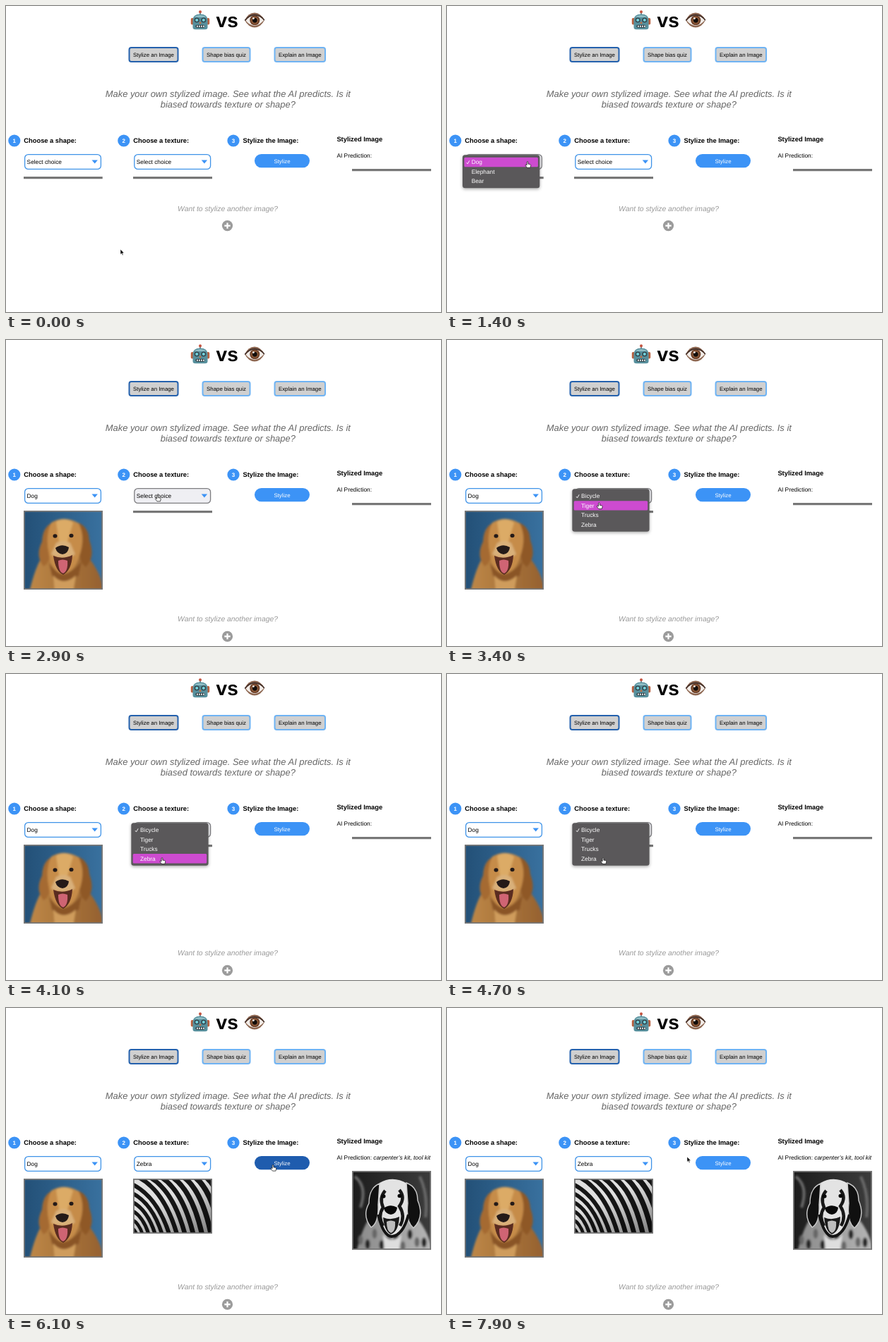
Animation, 616 px wide and 434 px high, one loop 8 s. Source, as an HTML page:

```html
<!DOCTYPE html>
<html lang="en">
<head>
<meta charset="utf-8">
<title>Stylize an image</title>
<style>
  html, body { margin: 0; width: 100%; height: 100%; overflow: hidden; background: #fff; }
  svg { display: block; width: 100vw; height: 100vh; }
  svg svg { width: auto; height: auto; }
  text { font-family: "Liberation Sans", Arial, Helvetica, sans-serif; text-rendering: geometricPrecision; }
</style>
</head>
<body>
<svg id="stage" viewBox="0 0 616 434" xmlns="http://www.w3.org/2000/svg"></svg>
<script>
const LOOP = 8000, STEP = 100, ROW = 13.4, MENU_TOP = 211.3;
const BLUE = '#3c93f6', GREY = '#777';

const text = (x, y, size, str, attrs = '') =>
  `<text x="${x}" y="${y}" font-size="${size}" ${attrs}>${str}</text>`;
const rect = (x, y, w, h, fill, attrs = '') =>
  `<rect x="${x}" y="${y}" width="${w}" height="${h}" fill="${fill}" ${attrs}/>`;
const circle = (x, y, r, fill, attrs = '') =>
  `<circle cx="${x}" cy="${y}" r="${r}" fill="${fill}" ${attrs}/>`;
const ellipse = (x, y, rx, ry, fill) =>
  `<ellipse cx="${x}" cy="${y}" rx="${rx}" ry="${ry}" fill="${fill}"/>`;
const path = (d, fill, attrs = '') => `<path d="${d}" fill="${fill}" ${attrs}/>`;
const line = (d, color, width) => path(d, 'none', `stroke="${color}" stroke-width="${width}"`);
const group = (id, content, attrs = '') => `<g id="${id}" ${attrs}>${content}</g>`;
const blur = (name, content) => `<g filter="url(#${name})">${content}</g>`;

const BOLD = 'font-weight="700"', ITALIC = 'font-style="italic"', MIDDLE = 'text-anchor="middle"';

function navButton(x, w, label, border) {
  return rect(x + 1, 59, w - 2, 20, '#d0d0d0', `rx="3" stroke="${border}" stroke-width="2"`) +
    text(x + w / 2, 72.3, 7.85, label, MIDDLE);
}

function stepTitle(x, number, title) {
  return circle(x, 191, 8.6, BLUE) +
    text(x, 193.9, 8, number, `${BOLD} ${MIDDLE} fill="#fff"`) +
    text(x + 13.5, 194.2, 9.33, title, BOLD);
}

function select(id, x) {
  return rect(x + .6, 210.6, 107.8, 20.8, '#fff', `id="${id}Box" rx="5" stroke-width="1.3"`) +
    text(x + 3.6, 224, 8.3, 'Select choice', `id="${id}Label"`) +
    path(`M${x + 95.5} 218.4h8.4l-4.2 5.2z`, BLUE);
}

function menu(id, x, items) {
  const rows = items.map((item, i) =>
    text(x + 12.7, 224.4 + i * ROW, 8.3, item, 'fill="#fff"')).join('');
  return group(id,
    rect(x, MENU_TOP, 109.3, items.length * ROW + 6.8, '#5a595a', 'rx="3.5" filter="url(#shadow)"') +
    rect(x + 2.4, 0, 104.5, ROW, '#cd4bd0', `id="${id}Mark" rx="1.5"`) + rows +
    line(`M${x + 5.6} 222l1.6 1.9 2.6-4.6`, '#fff', .9));
}

function frame(id, x, y, h, content) {
  return group(id, `<g clip-path="url(#clip${h})">${content}</g>` +
    rect(.9, .9, 110.2, h - 1.8, 'none', `stroke="${GREY}" stroke-width="1.8"`),
    `transform="translate(${x} ${y})"`);
}

const eyesAndNose = color =>
  ellipse(44.5, 36, 3, 2.8, color) + ellipse(67.5, 35.5, 3, 2.8, color) +
  path('M45 53Q54 46 64 52Q63 61 55 62Q47 61 45 53Z', color);

function goldenDog() {
  return rect(0, 0, 112, 112, 'url(#sky)') +
    blur('soft',
      path('M28 62Q16 80 8 116H114Q110 88 90 64Z', 'url(#fur)') +
      path('M36 74Q56 104 82 72L78 92Q56 110 40 92Z', '#8a5526') +
      path('M42 92Q56 108 74 92L70 116H44Z', '#cf9c5b') +
      path('M39 18Q27 24 26 44Q16 64 28 79Q40 74 38 46Z', '#a56a30') +
      path('M77 17Q92 23 93 42Q102 66 88 80Q76 72 79 44Z', '#8f5828') +
      path('M39 17Q58 6 78 18Q88 38 79 64Q72 88 55 90Q39 86 36 62Q30 36 39 17Z', '#c68c49') +
      path('M46 16Q58 8 70 17L62 44H50Z', '#dcab66') +
      path('M46 46Q56 40 66 46L73 62Q56 72 39 62Z', '#d9b07a')) +
    blur('crisp',
      path('M42 64Q55 70 69 63Q68 84 56 91Q45 86 42 64Z', '#5a2c20') +
      path('M49 71Q55 68 62 71Q63 86 56 89Q49 87 49 71Z', '#cf6473') +
      eyesAndNose('#241a18'));
}

function patternedDog() {
  let out = rect(0, 0, 112, 112, 'url(#night)');
  let spots = '';
  for (let i = 0; i < 10; i++) {
    spots += ellipse(12 + i * 10, 98 + 9 * Math.sin(i * 2.4), 3.4, 7, i % 2 ? '#222' : '#666');
  }
  return out +
    blur('soft',
      line('M4 8Q22 22 12 52M96 8Q108 34 104 66', '#6a6a6a', 4) +
      path('M28 62Q14 80 6 116H114Q110 88 90 64Z', 'url(#coat)') + spots +
      path('M44 90Q56 106 70 90L66 116H46Z', '#dedede')) +
    blur('crisp',
      path('M39 17Q58 6 78 18Q88 38 79 64Q72 90 55 92Q39 88 36 62Q30 36 39 17Z', '#e3e3e3') +
      path('M39 18Q24 24 24 46Q14 64 27 80Q38 74 37 48Z', '#101010', 'stroke="#ccc" stroke-width="1.4"') +
      path('M77 17Q93 23 93 42Q103 66 87 81Q76 72 79 46Z', '#101010', 'stroke="#ccc" stroke-width="1.4"') +
      line('M47 28Q38 38 44 52Q36 64 44 78M67 27Q76 38 67 50Q76 64 68 78', '#181818', 4.5) +
      line('M37 62Q44 92 56 93Q72 92 80 62', '#141414', 4) +
      path('M44 66Q55 71 67 65Q66 86 55 90Q46 86 44 66Z', '#1a1a1a') +
      path('M49 72Q55 69 61 72Q62 86 55 88Q49 86 49 72Z', '#bdbdbd') +
      eyesAndNose('#080808'));
}

function zebra() {
  let out = rect(0, 0, 112, 78, '#e0e0e0');
  for (let i = 0; i < 13; i++) {
    const x = Math.max(-2, 16 * (i - 5.5)), y = Math.max(-2, 70 - 12.5 * i);
    const end = 6 + 8 * i + i * i / 4;
    out += line(`M${x} ${y}Q${x + (end - x) * .68} ${y + (80 - y) * .25} ${end} 82`,
      '#161616', 4.4 + i * .3);
  }
  return out + rect(0, 0, 112, 78, 'url(#shade)');
}

const robot =
  rect(274, 8, 2, 5, '#7d8b92') + circle(275, 8.2, 2, '#c4533f') +
  rect(261.8, 17, 4, 9.5, '#b9603f', 'rx="1.8"') + rect(284.2, 17, 4, 9.5, '#b9603f', 'rx="1.8"') +
  path('M264.5 20Q264.5 11.5 275 11.5Q285.5 11.5 285.5 20V30Q285.5 33.3 282 33.3H268Q264.5 33.3 264.5 30Z', '#57909d') +
  path('M267 16Q269 13 275 13Q281 13 283 16Z', '#8fbcc4') +
  [270.2, 279.8].map(x => circle(x, 20, 3.6, '#33454c') + circle(x, 20, 2.1, '#74d3dc')).join('') +
  path('M275 21.8l1.8 3.2h-3.6z', '#c8683c') +
  rect(268.5, 26.8, 13, 4, '#2b373c', 'rx="1.8"') +
  [270, 273, 276, 279].map(x => rect(x, 27.6, 1.8, 2.4, '#dfe6e8')).join('');

const eye =
  path('M338 20Q343 9.5 352 9.5Q361 10 366 20Q361 30 352 30.5Q343 30 338 20Z', '#8d6650') +
  path('M339.5 20.8Q345 13.4 352.5 13.4Q360 14 365 20.3Q359 27.6 352 28Q345 27.6 339.5 20.8Z', '#f1ece8') +
  circle(352.3, 20.3, 7, '#6b3f28') + circle(352.3, 20.3, 5.2, '#8e5a38') +
  circle(352.3, 20.3, 3.4, '#120d0b') + circle(350.4, 17.6, 1.4, '#fff') +
  line('M338.3 20.5Q344.5 12.4 352.5 12.4Q361 13 365.8 20', '#3a2a25', 1.5);

const gradient = (id, from, to, attrs = '') =>
  `<linearGradient id="${id}" ${attrs}><stop offset="0" ${from}/><stop offset="1" ${to}/></linearGradient>`;
const clip = h => `<clipPath id="clip${h}">${rect(0, 0, 112, h, '#000')}</clipPath>`;

const defs = '<defs>' + clip(112) + clip(78) +
  gradient('sky', 'stop-color="#235077"', 'stop-color="#39719f"') +
  gradient('fur', 'stop-color="#bd8747"', 'stop-color="#94602f"') +
  gradient('night', 'stop-color="#1c1c1c"', 'stop-color="#3c3c3c"') +
  gradient('coat', 'stop-color="#8a8a8a"', 'stop-color="#b5b5b5"') +
  gradient('shade', 'stop-color="#000" stop-opacity="0"', 'stop-color="#000" stop-opacity=".45"',
    'x1=".5" y1=".3" x2="1" y2="1"') +
  '<filter id="soft"><feGaussianBlur stdDeviation="1.6"/></filter>' +
  '<filter id="crisp"><feGaussianBlur stdDeviation=".6"/></filter>' +
  '<filter id="shadow" x="-20%" y="-20%" width="140%" height="150%">' +
  '<feDropShadow dx="0" dy="1.5" stdDeviation="2.2" flood-opacity=".35"/></filter></defs>';

const stage = document.getElementById('stage');
stage.innerHTML = defs + robot + text(297.6, 29.8, 28, 'vs', BOLD) + eye +
  navButton(173.5, 71, 'Stylize an Image', '#2461ad') +
  navButton(277.5, 69, 'Shape bias quiz', '#6fb3f3') +
  navButton(379.5, 73.5, 'Explain an Image', '#6fb3f3') +
  text(314.3, 128.8, 12.93, 'Make your own stylized image. See what the AI predicts. Is it', `${ITALIC} ${MIDDLE} fill="#666"`) +
  text(314.3, 143.6, 12.93, 'biased towards texture or shape?', `${ITALIC} ${MIDDLE} fill="#666"`) +
  stepTitle(11.8, 1, 'Choose a shape:') +
  stepTitle(166.8, 2, 'Choose a texture:') +
  stepTitle(322, 3, 'Stylize the Image:') +
  text(468.4, 191.7, 9.33, 'Stylized Image', BOLD) +
  text(468.4, 215, 8.35, 'AI Prediction:') +
  text(520.3, 215, 8.35, 'carpenter’s kit, tool kit', `id="answer" ${ITALIC}`) +
  select('shape', 26) + select('texture', 181.2) +
  rect(352, 210, 78, 19.2, BLUE, 'id="button" rx="9.6"') +
  text(391, 222.7, 7.85, 'Stylize', `${MIDDLE} fill="#fff"`) +
  rect(25, 242, 111.7, 3.2, GREY) + rect(180, 242, 112, 3.2, GREY) + rect(490, 231, 112, 3.2, GREY) +
  frame('dog', 25, 242, 112, goldenDog()) +
  frame('zebra', 180, 242, 78, zebra()) +
  frame('result', 490, 231, 112, patternedDog()) +
  group('again',
    text(314, 290.6, 10.35, 'Want to stylize another image?', `${ITALIC} ${MIDDLE} fill="#999"`) +
    circle(313.5, 311.6, 7.6, '#9b9b9b') +
    line('M309.3 311.6h8.4M313.5 307.4v8.4', '#fff', 2.2)) +
  menu('shapeMenu', 22, ['Dog', 'Elephant', 'Bear']) +
  menu('textureMenu', 177.3, ['Bicycle', 'Tiger', 'Trucks', 'Zebra']) +
  group('arrow', path('M0 0V8.2L1.9 6.5L3.2 9.4L4.5 8.8L3.2 6H5.8Z', '#000', 'stroke="#fff" stroke-width=".6"')) +
  group('hand', path('M-1 .7Q0-.7 1 .7V4L4.2 4.5Q5.5 5 5.2 6.6L4.4 9.8H-.6L-3.4 6.2Q-3.4 4.6-1.9 5.2L-1 6Z',
    '#fff', 'stroke="#111" stroke-width=".8"'));

const el = Object.fromEntries([...stage.querySelectorAll('[id]')].map(node => [node.id, node]));

// Pointer route: time, x, y.
const route = [
  [0, 162, 345], [100, 139, 320], [200, 112, 289], [300, 112, 289], [600, 112, 229], [1000, 112, 229],
  [1100, 114, 220.5], [2500, 114, 220.5], [2600, 145, 221], [2800, 207, 220], [2900, 214.5, 220],
  [3200, 214.5, 220], [3800, 217, 252], [3900, 217, 252], [4000, 219, 254], [4100, 221, 260.5],
  [4900, 221, 260.5], [5000, 235, 260], [5200, 304, 244], [5400, 352, 232], [5500, 370, 225],
  [5700, 378, 222.3], [7700, 378, 222.3], [7800, 354, 217], [7900, 340, 211]
];

function pointerAt(t) {
  const next = route.findIndex(p => p[0] > t);
  if (next < 0) return route[route.length - 1].slice(1);
  const [t0, x0, y0] = route[next - 1], [t1, x1, y1] = route[next];
  const k = (t - t0) / (t1 - t0);
  return [x0 + (x1 - x0) * k, y0 + (y1 - y0) * k];
}

const show = (node, on) => node.setAttribute('visibility', on ? 'visible' : 'hidden');

function drawSelect(id, hover, label) {
  el[id + 'Box'].setAttribute('fill', hover ? '#efeff3' : '#fff');
  el[id + 'Box'].setAttribute('stroke', hover ? '#7d7d80' : '#3f93e8');
  el[id + 'Label'].textContent = label;
}

// On a pick the mark blinks off, then the menu fades out.
function drawMenu(id, t, open, pick, y) {
  const row = Math.max(0, Math.floor((y - 215) / ROW));
  show(el[id], t >= open && t < pick + 200);
  el[id].setAttribute('opacity', t >= pick + 100 ? .5 : 1);
  el[id + 'Mark'].setAttribute('y', 214.8 + row * ROW);
  el[id + 'Mark'].setAttribute('opacity', t >= pick ? 0 : 1);
}

function draw(time) {
  const t = Math.floor(time % LOOP / STEP) * STEP;
  const within = (from, to) => t >= from && t < to;
  const [x, y] = pointerAt(t);

  drawSelect('shape', within(1100, 2600), t < 1900 ? 'Select choice' : 'Dog');
  drawSelect('texture', within(2800, 5300), t < 4800 ? 'Select choice' : 'Zebra');
  drawMenu('shapeMenu', t, 1200, 1800, y);
  drawMenu('textureMenu', t, 3000, 4700, y);

  show(el.dog, t >= 2300);
  show(el.zebra, t >= 5300);
  show(el.result, t >= 6100);
  show(el.answer, t >= 6100);
  el.again.setAttribute('transform', `translate(0 ${t >= 2300 ? 108.8 : 0})`);
  el.button.setAttribute('fill', within(5500, 7900) ? '#1f5cae' : BLUE);

  const hand = within(1100, 2600) || within(2800, 5000) || within(5500, 7900);
  show(el.hand, hand);
  show(el.arrow, !hand);
  (hand ? el.hand : el.arrow).setAttribute('transform', `translate(${x} ${y}) scale(.9)`);
}

const start = performance.now();
function tick() {
  draw(performance.now() - start);
  requestAnimationFrame(tick);
}
draw(0);
requestAnimationFrame(tick);
</script>
</body>
</html>
```
